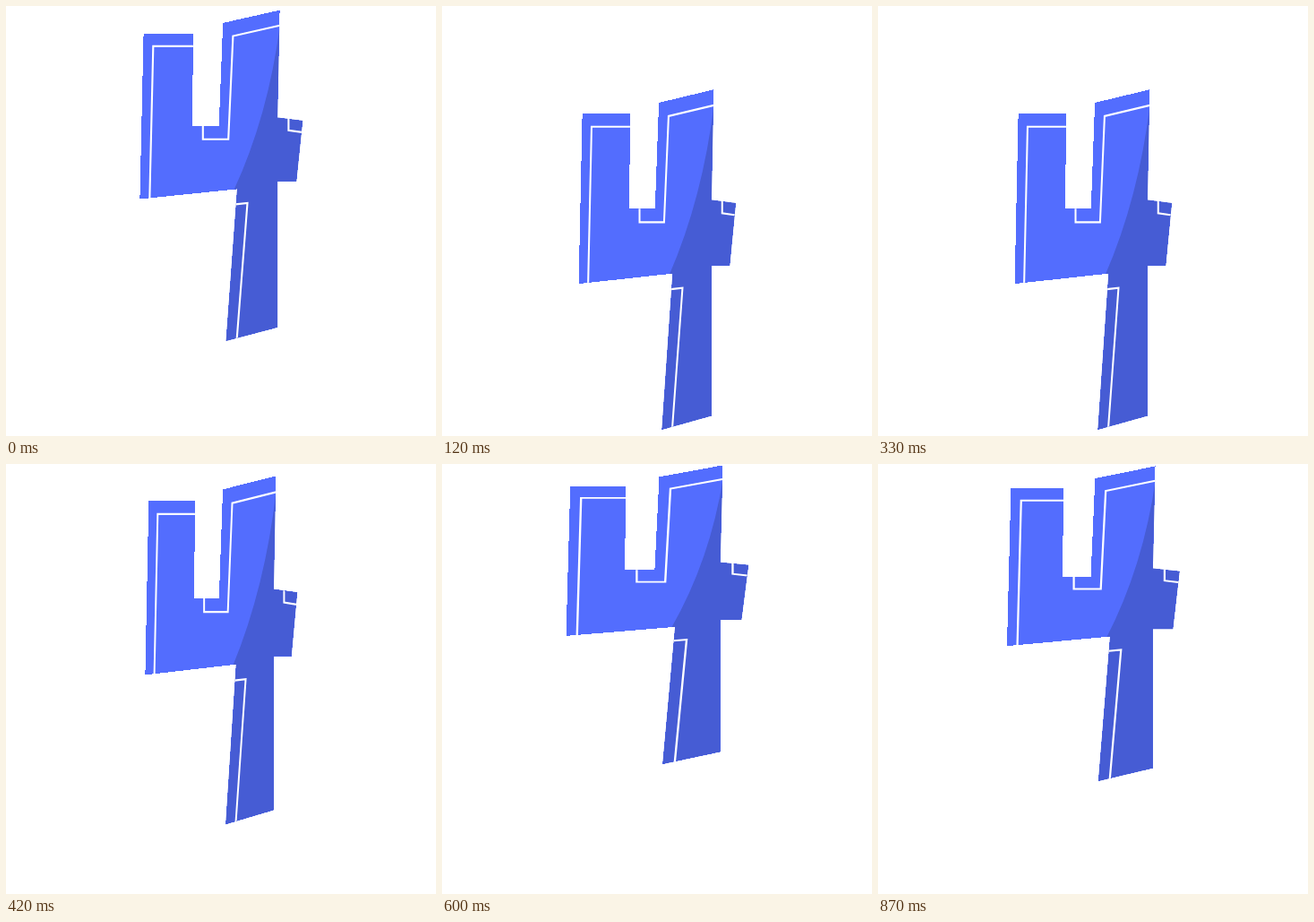
Recreate the animation shown at these times as an HTML page. Size 480x480 px, loop 0.9 s.

```html
<!DOCTYPE html>
<html lang="en">
<head>
<meta charset="utf-8">
<title>Bouncing four</title>
<style>
  html, body { margin: 0; width: 100%; height: 100%; overflow: hidden; background: #fff; }
  svg { display: block; width: 100%; height: 100%; }
</style>
</head>
<body>
<svg viewBox="0 0 480 480">
  <defs>
    <path id="shape" d="M153.6 31H209L207.9 134H237.7L242.2 19.3L305.6 5L303.1 124.6L331.2 128L324.2 195.5H303.1V358.2L245.6 373.3L258 204.2L149.4 215.3Z"/>
    <clipPath id="inside"><use href="#shape"/></clipPath>
  </defs>
  <g id="four">
    <use href="#shape" fill="#536dfe" shape-rendering="crispEdges"/>
    <g clip-path="url(#inside)">
      <path fill="#465cd4" d="M254 206Q293 122 306 20H345V400H240V210Z"/>
      <path fill="none" stroke="#fff" stroke-width="2.1" d="M160.2 220L164.3 45.2H214M219.8 130V148.7H248.2L253.4 33.8L310 21.1M315.4 120V138.8L336 141.7M257.3 376L269.5 219.8L254 221.4"/>
    </g>
  </g>
</svg>
<script>
  const LOOP = 900, TICK = 30;
  const FOOT = { x: 240, y: 373 };          // anchor inside the drawing
  const REST = { x: 1.121, y: 0.905 };      // size at the top of the bounce
  const TOP = 334.6, DROP = 151.3;          // height of the foot and its travel
  const THIN = 0.8, WIDE = 1.125, TURN = 2 / 3;

  const mix = (a, b, t) => a + (b - a) * t;
  const clamp = t => Math.min(Math.max(t, 0), 1);

  // S-curve from 0 to 1: p shapes the start, q the end, k moves the middle
  const ease = (t, p, q, k) => t ** p / (t ** p + k * (1 - t) ** q);

  // Narrows while falling, then flattens on the ground
  function widthAt(t) {
    const thin = mix(1, THIN, ease(clamp(t / TURN), 2.94, 2.14, 7.1));
    return mix(thin, WIDE, ease(clamp((t - TURN) / (1 - TURN)), 2, 2, 0.8));
  }

  const four = document.getElementById('four');

  function draw(ms) {
    const now = Math.floor((ms % LOOP) / TICK) * TICK;
    const phase = (now / LOOP + 0.25) % 1;
    const t = 1 - Math.abs(1 - 2 * phase);  // 0 at the top, 1 on the ground
    const w = widthAt(t);
    const y = TOP + DROP * ease(t, 4.4, 2, 0.545);
    four.setAttribute('transform',
      `translate(${FOOT.x} ${y}) scale(${REST.x * w} ${REST.y * (2 - w)}) translate(${-FOOT.x} ${-FOOT.y})`);
  }

  const start = performance.now();
  function loop() {
    draw(performance.now() - start);
    requestAnimationFrame(loop);
  }
  loop();
</script>
</body>
</html>
```
